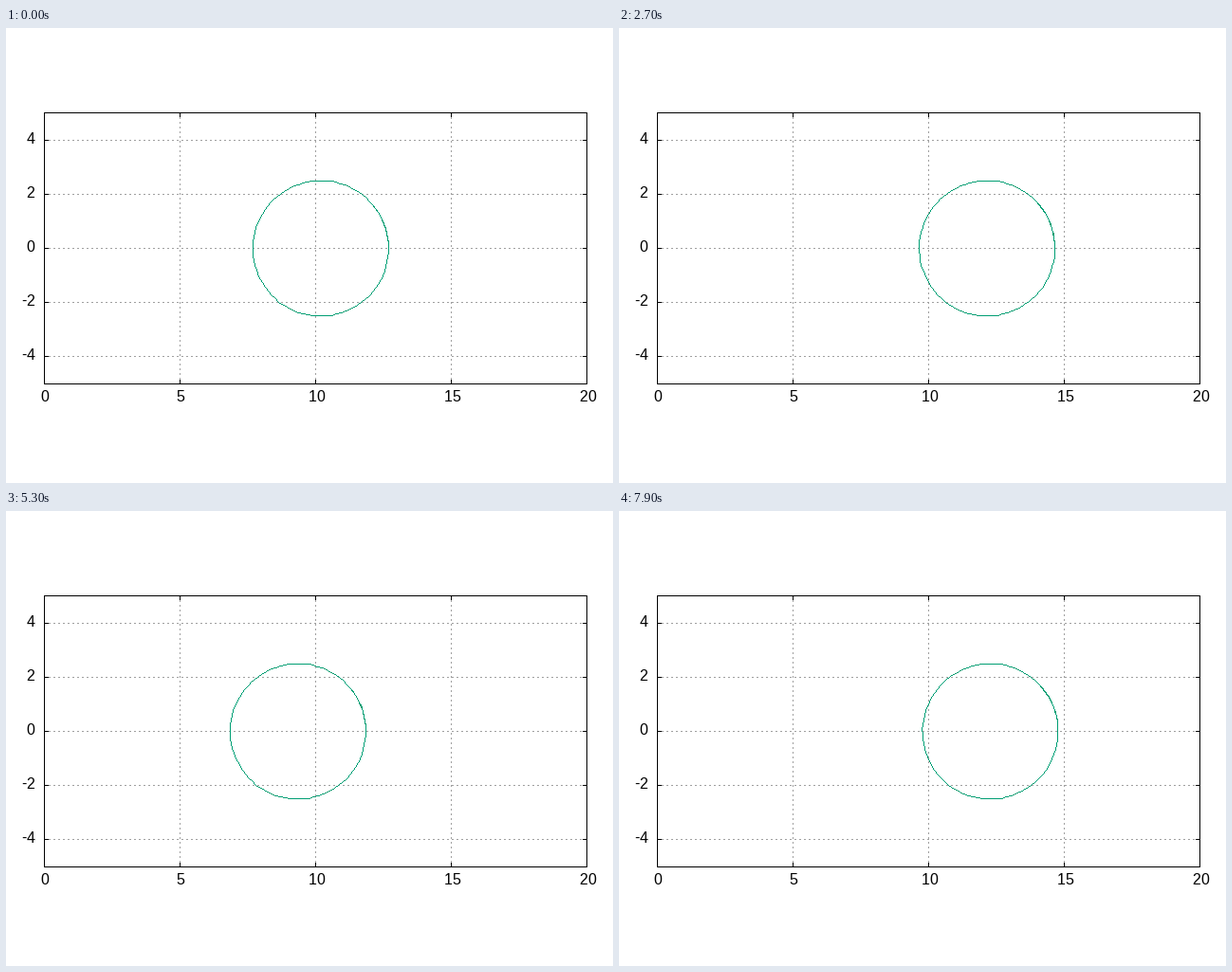
Write a matplotlib script that moves like this. It is 640 px wide and 480 px high and loops after 8000 ms.

```python
import numpy as np
import matplotlib.pyplot as plt
from matplotlib.animation import FuncAnimation
from matplotlib.collections import PolyCollection

W, H, DPI = 640, 480, 100
FRAMES, STEP = 80, 100
LEFT, RIGHT, TOP, BOTTOM = 40, 612, 89, 375
UNIT, MID_Y = 28.6, 232
RADIUS = 2.5 * UNIT
PT = 72 / DPI

# Motion: swings along an eccentric phase, quick at the left end, slow at the right
PERIOD, T_MIN = 5.744, 5.035
MID, AMP = 346.2, 44.75

fig = plt.figure(figsize=(W / DPI, H / DPI), dpi=DPI, facecolor="white")
ax = fig.add_axes([0, 0, 1, 1])
ax.set_xlim(0, W)
ax.set_ylim(H, 0)
ax.axis("off")


def line(x0, y0, x1, y1, color="black", z=3, **style):
    ax.plot([x0, x1], [y0, y1], color=color, lw=PT, antialiased=False, snap=False,
            solid_capstyle="butt", dash_capstyle="butt", zorder=z, **style)


def hline(y, x0, x1, **style):
    line(x0, y + 0.5, x1 + 1, y + 0.5, **style)


def vline(x, y0, y1, **style):
    line(x + 0.5, y0, x + 0.5, y1 + 1, **style)


def label(pen, y, text):
    """Set characters one by one on whole pixels."""
    for ch in text:
        ax.text(pen - 0.5, y, ch, family="Liberation Sans", size=16 * PT,
                color="black", ha="left", va="baseline")
        pen += advance(ch)


def advance(ch):
    return 5 if ch == "-" else 9


def width(text):
    return sum(map(advance, text))


GRID = dict(color="#a0a0a0", z=1, dashes=(2, 3))
TICK = 4

for value in range(0, 21, 5):
    x = LEFT + round(value * UNIT)
    text = str(value)
    if LEFT < x < RIGHT:
        vline(x, TOP, BOTTOM, **GRID)
    vline(x, BOTTOM - TICK, BOTTOM)
    vline(x, TOP, TOP + TICK)
    label(x + 1 - (width(text) - 1) // 2, 394, text)

for value in range(-4, 5, 2):
    y = MID_Y - round(value * UNIT)
    text = str(value)
    hline(y, LEFT, RIGHT, **GRID)
    hline(y, LEFT, LEFT + TICK)
    hline(y, RIGHT - TICK, RIGHT)
    label(31 - width(text), y + 4, text)

for y in (TOP, BOTTOM):
    hline(y, LEFT, RIGHT)
for x in (LEFT, RIGHT):
    vline(x, TOP, BOTTOM)


def center_x(t):
    mean = 2 * np.pi * (t - T_MIN) / PERIOD
    e = mean
    for _ in range(40):
        e = mean + (0.497 - 0.035 * np.cos(e)) * np.sin(e)
    return MID - AMP * np.cos(e)


def snap(v):
    return np.floor(v + 0.5).astype(int)


def ring_pixels(cx):
    """Pixels of a one pixel wide, unsmoothed ring that overlaps its own start."""
    a = np.linspace(0, 7, 100)
    pts = np.column_stack([snap(cx + RADIUS * np.cos(a)),
                           MID_Y - snap(RADIUS * np.sin(a))])
    cells = []
    for p, q in zip(pts[:-1], pts[1:]):
        n = max(abs(q - p).max(), 1)
        cells.append(snap(p + (q - p) * np.arange(n + 1)[:, None] / n))
    return np.unique(np.vstack(cells), axis=0)


SQUARE = np.array([[0, 0], [1, 0], [1, 1], [0, 1]])
ring = PolyCollection([SQUARE], facecolors="#009e73", edgecolors="none", linewidths=0,
                      antialiaseds=False, snap=False, zorder=2)
ax.add_collection(ring, autolim=False)


def update(i):
    cells = ring_pixels(center_x(i * STEP / 1000))
    ring.set_verts(cells[:, None, :] + SQUARE)
    return ring,


anim = FuncAnimation(fig, update, frames=FRAMES, interval=STEP, repeat=True)
plt.show()
```
